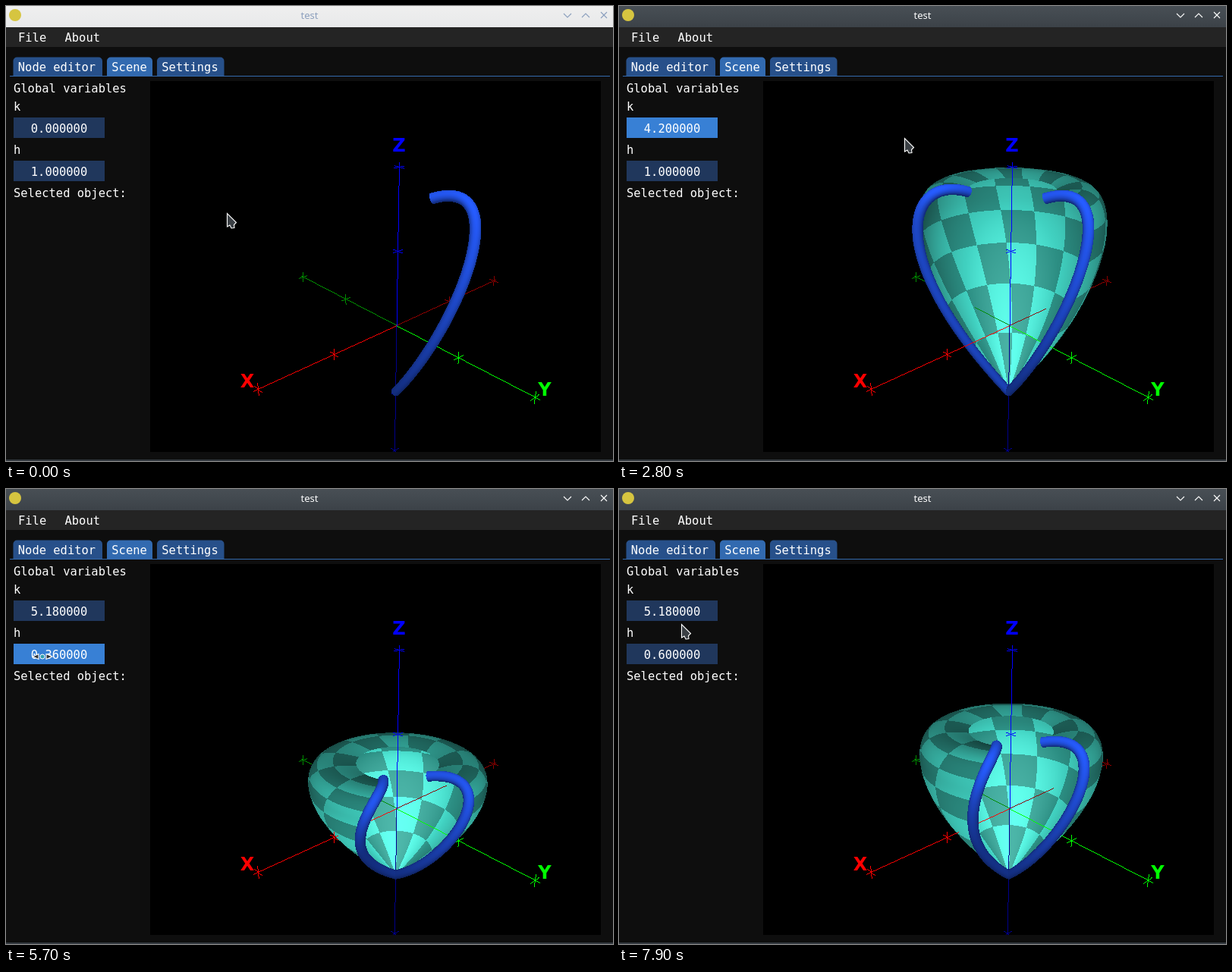
Recreate the animation shown at these times as an HTML page with a canvas. Size 800 px wide and 600 px high, loop 8 s.

```html
<!DOCTYPE html>
<html lang="en">
<head>
<meta charset="utf-8">
<title>test</title>
<style>
  html, body { margin: 0; width: 100%; height: 100%; overflow: hidden; background: #0e0e0e; }
  canvas { display: block; width: 800px; height: 600px; }
</style>
</head>
<body>
<canvas id="stage" width="800" height="600"></canvas>
<script>
const ctx = document.getElementById('stage').getContext('2d');
const LOOP = 8000, STEP = 100;
const MONO = '15.46px "DejaVu Sans Mono", monospace';
const VIEW = { x: 190, y: 99, w: 594, h: 489 };

// ---- timeline: rows of [time, ...values] ----
const K = [[1100, 0], [1400, 0.3], [1600, 0.68], [2000, 1.7], [2400, 3], [2500, 3], [2800, 4.2], [3500, 5.18]];
const H = [[5200, 1], [5700, 0.36], [6100, -0.2], [6300, -0.27], [6500, -0.26], [6700, -0.26], [7600, 0.6]];
const POINTER = [
  [200, 291, 273], [1000, 74, 164], [1100, 74, 165], [1600, 123, 166], [2000, 197, 168],
  [2400, 290, 171], [2500, 290, 171], [2800, 376, 174], [3500, 446, 178], [4300, 124, 209],
  [5200, 92, 219], [5700, 48, 221], [6100, 8, 221], [6300, 3, 221], [6500, 6, 221],
  [6700, 6, 221], [7600, 64, 220], [7900, 82, 178]
];

function track(keys, t) {
  if (t <= keys[0][0]) return keys[0].slice(1);
  for (let i = 1; i < keys.length; i++) {
    const a = keys[i - 1], b = keys[i];
    if (t <= b[0]) {
      const u = (t - a[0]) / (b[0] - a[0]);
      return a.slice(1).map((v, j) => v + (b[j + 1] - v) * u);
    }
  }
  return keys[keys.length - 1].slice(1);
}

// ---- depth-buffered renderer ----
const img = ctx.createImageData(VIEW.w, VIEW.h);
const px = img.data;
const depth = new Float32Array(VIEW.w * VIEW.h);
const EYE = [4.33, 4.36, 3.43];
const LIGHT = [0.68, 0.66, 0.3];
const dot = (a, b) => a[0] * b[0] + a[1] * b[1] + a[2] * b[2];
const cross = (a, b) => [a[1] * b[2] - a[2] * b[1], a[2] * b[0] - a[0] * b[2], a[0] * b[1] - a[1] * b[0]];

function project([x, y, z], shade = 1) {
  const d = 1 / (1 - 0.0875 * x - 0.0965 * y - 0.0586 * z);
  return [
    514.5 - VIEW.x + (-75.3 * x + 73.6 * y + 1.5 * z) * d,
    421 - VIEW.y + (34.65 * x + 38.2 * y - 92.26 * z) * d,
    d, shade
  ];
}

function plot(x, y, d, r, g, b) {
  const i = y * VIEW.w + x;
  if (d < depth[i]) return;
  depth[i] = d;
  px[i * 4] = r;
  px[i * 4 + 1] = g;
  px[i * 4 + 2] = b;
}

function tri(a, b, c, [r, g, bl], glow) {
  const area = (b[0] - a[0]) * (c[1] - a[1]) - (b[1] - a[1]) * (c[0] - a[0]);
  if (Math.abs(area) < 1e-6) return;
  const x0 = Math.max(0, Math.ceil(Math.min(a[0], b[0], c[0])));
  const x1 = Math.min(VIEW.w - 1, Math.floor(Math.max(a[0], b[0], c[0])));
  const y0 = Math.max(0, Math.ceil(Math.min(a[1], b[1], c[1])));
  const y1 = Math.min(VIEW.h - 1, Math.floor(Math.max(a[1], b[1], c[1])));
  for (let y = y0; y <= y1; y++) {
    for (let x = x0; x <= x1; x++) {
      const v = ((x - a[0]) * (c[1] - a[1]) - (y - a[1]) * (c[0] - a[0])) / area;
      const w = ((b[0] - a[0]) * (y - a[1]) - (b[1] - a[1]) * (x - a[0])) / area;
      const u = 1 - v - w;
      if (u < -1e-6 || v < -1e-6 || w < -1e-6) continue;
      const s = u * a[3] + v * b[3] + w * c[3];
      const white = glow * Math.max(0, s - 0.9);
      plot(x, y, u * a[2] + v * b[2] + w * c[2], r * s + white, g * s + white * 0.5, bl * s + white * 0.5);
    }
  }
}

function quad(a, b, c, d, color, glow = 0) {
  tri(a, b, c, color, glow);
  tri(a, c, d, color, glow);
}

function line(p, q, color) {
  const a = project(p), b = project(q);
  const n = Math.ceil(Math.max(Math.abs(b[0] - a[0]), Math.abs(b[1] - a[1]))) || 1;
  for (let i = 0; i <= n; i++) {
    const [x, y, d] = a.map((v, j) => v + (b[j] - v) * i / n);
    const ix = Math.round(x), iy = Math.round(y);
    if (ix >= 0 && iy >= 0 && ix < VIEW.w && iy < VIEW.h) plot(ix, iy, d, ...color);
  }
}

// ---- scene ----
function bezier(p, t) {
  const s = 1 - t;
  return [
    s * s * s * p[0] + 3 * t * s * s * p[1] + 3 * t * t * s * p[2] + t * t * t * p[3],
    s * s * (p[1] - p[0]) + 2 * s * t * (p[2] - p[1]) + t * t * (p[3] - p[2])
  ];
}

// A point of the space curve: polar place, tangent, and the normal of the surface it sweeps
function curve(t, h) {
  const [x, dx] = bezier([0, 0.42, -0.35, 0], t);
  const [y, dy] = bezier([0, 1.37, 1.33, 0.5], t);
  const [z, dz] = bezier([-1, 1.02 * h - 0.27, 1.92 * h + 0.2, 1.75 * h], t);
  const a = t ? Math.atan2(y, x) : Math.atan2(dy, dx);
  const dr = dx * Math.cos(a) + dy * Math.sin(a);
  const da = dy * Math.cos(a) - dx * Math.sin(a);
  const flat = Math.hypot(dr, dz), len = Math.hypot(flat, da);
  return { r: Math.hypot(x, y), z, a, nr: dz / flat, nz: -dr / flat, tangent: [dr / len, da / len, dz / len] };
}

const spin = (r, z, a) => [r * Math.cos(a), r * Math.sin(a), z];

function surface(k, h) {
  const cols = 10, rows = 8, subU = 5, subV = 6;
  const grid = [];
  for (let j = 0; j <= rows * subV; j++) {
    const p = curve(j / (rows * subV), h);
    grid.push(Array.from({ length: cols * subU + 1 }, (_, i) => {
      const a = p.a + k * i / (cols * subU);
      const pos = spin(p.r, p.z, a), n = spin(p.nr, p.nz, a);
      const side = Math.sign(dot(n, EYE.map((e, m) => e - pos[m])));
      const s = 0.42 + 0.45 * Math.max(0, side * dot(n, LIGHT)) + 0.38 * Math.max(0, -p.nz);
      return project(pos, s);
    }));
  }
  const light = [72, 232, 214], dark = light.map(c => c * 0.68);
  for (let j = 0; j < rows * subV; j++) {
    for (let i = 0; i < cols * subU; i++) {
      const odd = (Math.floor(i / subU) + Math.floor(j / subV)) % 2;
      quad(grid[j][i], grid[j][i + 1], grid[j + 1][i + 1], grid[j + 1][i], odd ? light : dark, 130);
    }
  }
}

function tube(angle, h) {
  const radius = 0.06, sides = 16, parts = 48, blue = [38, 92, 255];
  const rings = [];
  for (let j = 0; j <= parts; j++) {
    const p = curve(j / parts, h), a = p.a + angle;
    const mid = spin(p.r, p.z, a), n = spin(p.nr, p.nz, a);
    const [tr, ta, tz] = p.tangent;
    const along = [tr * Math.cos(a) - ta * Math.sin(a), tr * Math.sin(a) + ta * Math.cos(a), tz];
    const across = cross(along, n);
    const fade = Math.min(1, 0.87 + 0.11 * p.z);
    const ring = [];
    for (let i = 0; i <= sides; i++) {
      const turn = i / sides * 2 * Math.PI;
      const dir = n.map((v, m) => v * Math.cos(turn) + across[m] * Math.sin(turn));
      const s = (0.46 + 0.56 * Math.max(0, dot(dir, [0.5, 0.5, 0.7]))) * fade;
      ring.push(project(mid.map((v, m) => v + dir[m] * radius), s));
    }
    rings.push(ring);
    if (j === 0 || j === parts) {
      const hub = project(mid, 0.6 * fade);
      for (let i = 0; i < sides; i++) {
        tri(hub, [...ring[i].slice(0, 3), hub[3]], [...ring[i + 1].slice(0, 3), hub[3]], blue, 0);
      }
    }
  }
  for (let j = 0; j < parts; j++) {
    for (let i = 0; i < sides; i++) {
      quad(rings[j][i], rings[j][i + 1], rings[j + 1][i + 1], rings[j + 1][i], blue);
    }
  }
}

function axes() {
  for (let m = 0; m < 3; m++) {
    const at = v => [0, 1, 2].map(i => i === m ? v : 0);
    for (const sign of [-1, 1]) {
      const color = at(sign > 0 ? 255 : 140);
      line(at(0), at(2.05 * sign), color);
      for (const v of [sign, 2 * sign]) {
        for (let o = 0; o < 3; o++) {
          if (o === m) continue;
          const p = at(v), q = at(v);
          p[o] -= 0.075;
          q[o] += 0.075;
          line(p, q, color);
        }
      }
    }
  }
}

function scene(k, h) {
  depth.fill(0);
  for (let i = 0; i < px.length; i += 4) {
    px[i] = px[i + 1] = px[i + 2] = 0;
    px[i + 3] = 255;
  }
  if (k > 0) {
    surface(k, h);
    tube(k, h);
  }
  tube(0, h);
  axes();
  ctx.putImageData(img, VIEW.x, VIEW.y);
  const font = 'bold 24px "DejaVu Sans", sans-serif';
  text('X', 318, 503, '#ff0000', font, 'center');
  text('Y', 710, 514, '#00ff00', font, 'center');
  text('Z', 518, 192, '#0000ff', font, 'center');
}

// ---- window ----
function text(str, x, y, color = '#fff', font = MONO, align = 'left') {
  ctx.font = font;
  ctx.textAlign = align;
  ctx.fillStyle = color;
  ctx.fillText(str, x, y);
}

function rect(x, y, w, h, color) {
  ctx.fillStyle = color;
  ctx.fillRect(x, y, w, h);
}

function poly(points, fill, stroke, closed = true) {
  ctx.beginPath();
  points.forEach(([x, y]) => ctx.lineTo(x, y));
  if (closed) ctx.closePath();
  if (fill) { ctx.fillStyle = fill; ctx.fill(); }
  if (stroke) { ctx.strokeStyle = stroke; ctx.lineWidth = 1.1; ctx.stroke(); }
}

function disc(x, y, r, fill, stroke) {
  ctx.beginPath();
  ctx.arc(x, y, r, 0, 2 * Math.PI);
  ctx.fillStyle = fill;
  ctx.fill();
  if (stroke) { ctx.strokeStyle = stroke; ctx.lineWidth = 1; ctx.stroke(); }
}

function titleBar(focused) {
  const ink = focused ? '#fcfcfc' : '#8b9fbd';
  const g = ctx.createLinearGradient(0, 0, 0, 28);
  g.addColorStop(0, focused ? '#484f55' : '#efefef');
  g.addColorStop(1, focused ? '#3c4248' : '#e8e9ea');
  rect(0, 0, 800, 28, g);
  disc(12, 12, 8, '#d6c540');
  text('test', 400, 17, ink, '13px "Noto Sans", sans-serif', 'center');
  poly([[735, 10], [740, 15], [745, 10]], null, ink, false);
  poly([[759, 15], [764, 10], [769, 15]], null, ink, false);
  poly([[784, 8], [792, 16]], null, ink, false);
  poly([[792, 8], [784, 16]], null, ink, false);
}

function tab(label, x, w, color) {
  ctx.fillStyle = color;
  ctx.beginPath();
  ctx.roundRect(x, 67.5, w, 25, [5, 5, 0, 0]);
  ctx.fill();
  text(label, x + 6.3, 86);
}

function field(value, y, hover, active) {
  rect(10, y, 120, 27, active ? '#3880d5' : hover ? '#2a5690' : '#20375c');
  text(value.toFixed(6), 70, y + 20, '#fff', MONO, 'center');
}

function pointer(x, y, resize) {
  ctx.save();
  ctx.translate(x, y);
  if (resize) {
    for (const s of [-1, 1]) poly([[s * 13, 0], [s * 5, -3.5], [s * 5, 3.5]], '#31363b', '#fff');
    disc(0, 0, 3, '#2f9fb0', '#fff');
  } else {
    poly([[0.5, 0.5], [0.5, 18], [4, 16], [6, 20], [10, 19.5], [9.5, 15.5], [12.5, 12.5]], '#3b4045', '#fff');
  }
  ctx.restore();
}

function draw(t) {
  const round = v => Math.round(v * 100) / 100 + 0;
  const k = round(track(K, t)[0]), h = round(track(H, t)[0]);
  const [cx, cy] = track(POINTER, t);
  const inside = y => cx >= 10 && cx < 124 && cy >= y && cy < y + 27;
  const overK = inside(147), overH = inside(204);

  rect(0, 0, 800, 600, '#0e0e0e');
  titleBar(t >= 1200);
  rect(0, 28, 800, 26, '#242424');
  text('File', 16, 47);
  text('About', 77.5, 47);

  tab('Node editor', 9.5, 117.5, '#27508a');
  tab('Scene', 133, 60, '#326ab0');
  tab('Settings', 199, 88.5, '#27508a');
  rect(5, 92, 791, 1, '#3369ad');

  text('Global variables', 10, 114);
  text('k', 10, 138);
  field(k, 147, overK, t >= 1200 && t < 3600);
  text('h', 10, 195);
  field(h, 204, overH, t >= 5300 && t < 7700);
  text('Selected object:', 10, 252);

  scene(k, h);
  rect(0, 598, 800, 2, '#33393f');
  pointer(cx, cy, overK || overH);
}

let shown = -1;
function tick() {
  const t = Math.floor(performance.now() % LOOP / STEP) * STEP;
  if (t !== shown) draw(shown = t);
  requestAnimationFrame(tick);
}
tick();
</script>
</body>
</html>
```
